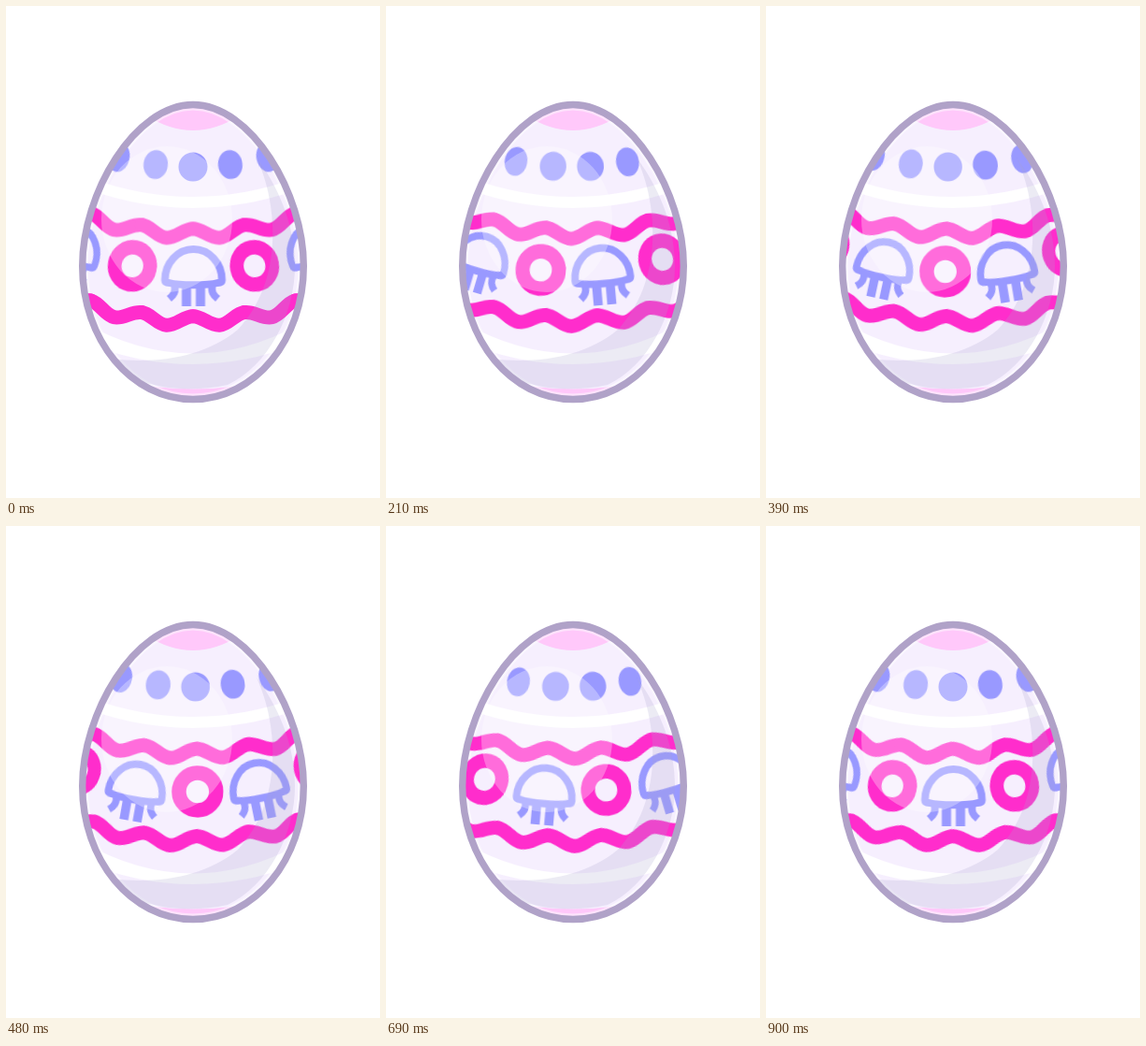
Recreate the animation shown at these times as an HTML page without scripts. Size 400 by 526 pixels, loop 930 ms.

```html
<!DOCTYPE html>
<html lang="en">
<head>
<meta charset="utf-8">
<title>Turning egg</title>
<style>
  html, body { margin: 0; width: 100%; height: 100%; overflow: hidden; background: #fff; }
  svg { display: block; width: 100%; height: 100%; }

  /* Each item sits in slot --i of an arc and advances two slots per loop. */
  .item {
    --next: calc(var(--i) + 1);
    --last: calc(var(--i) + 2);
    animation: ride 930ms steps(15) infinite;
  }
  .dots { --step: -7.16deg; --r: 320px; --squash: .19; fill: #9999ff; }
  .belt { --step: -10.75deg; --r: 350px; --squash: .055; }
  .wave { fill: none; stroke: #ff2dcc; stroke-width: 15; stroke-linecap: round;
          animation: turn 930ms steps(30) infinite; }

  @keyframes ride {
    0% { transform: rotate(calc(var(--i) * var(--step))) translateY(var(--r))
         scaleX(calc(1 / (1 + var(--squash) * max(var(--i), -1 * var(--i))))); }
    48.3871% { transform: rotate(calc(var(--next) * var(--step))) translateY(var(--r))
         scaleX(calc(1 / (1 + var(--squash) * max(var(--next), -1 * var(--next))))); }
    96.7742%, 100% { transform: rotate(calc(var(--last) * var(--step))) translateY(var(--r))
         scaleX(calc(1 / (1 + var(--squash) * max(var(--last), -1 * var(--last))))); }
  }
  @keyframes turn {
    0% { transform: rotate(0deg); }
    96.7742%, 100% { transform: rotate(-17.34deg); }
  }
</style>
</head>
<body>
<svg viewBox="0 0 400 526">
  <defs>
    <path id="egg" d="M200 105.5C138 105.5 81.7 200 81.7 278C81.7 357 134 420.5 200 420.5S318.3 357 318.3 278C318.3 200 262 105.5 200 105.5Z"/>
    <clipPath id="shell"><use href="#egg"/></clipPath>

    <circle id="dot" r="15.5"/>
    <circle id="ring" r="20" fill="none" stroke="#ff2dcc" stroke-width="15.5"/>
    <g id="jelly" fill="none" stroke="#9999ff" stroke-width="8" transform="translate(0 -4)">
      <path stroke-linejoin="round" d="M-30.5 13A30.5 33 0 0 1 30.5 13Q30.5 16 26 16C15 19 -15 19 -26 16Q-30.5 16 -30.5 13Z"/>
      <path d="M-20 18C-19 26 -21 29 -26 33M20 18C19 26 21 29 26 33"/>
      <path stroke-width="10" d="M-7.5 18V41M7.5 18V41"/>
    </g>

    <path id="ripple" d="M-27.57 363.66C-17.4 364.43 -10.2 375.3 0 375.3S17.4 364.43 27.57 363.66"/>
    <g id="pair">
      <use href="#ripple" transform="rotate(4.335)"/>
      <use href="#ripple" transform="rotate(-4.335)"/>
    </g>
    <g id="ripples">
      <use href="#pair" transform="rotate(34.68)"/>
      <use href="#pair" transform="rotate(17.34)"/>
      <use href="#pair"/>
      <use href="#pair" transform="rotate(-17.34)"/>
    </g>
  </defs>

  <g clip-path="url(#shell)">
    <use href="#egg" fill="#f6effe"/>
    <path fill="#fff" d="M90 184Q200 224 310 184V197Q200 235 90 197Z"/>
    <path fill="#fff" d="M80 337Q200 406 320 337V358Q200 408 80 358Z"/>
    <path fill="#ffc8fa" d="M150 100H250V117Q200 149 150 117Z"/>
    <path fill="#ffc8fa" d="M150 406Q200 413 250 406V424H150Z"/>
    <use href="#egg" fill="none" stroke="#fff" stroke-opacity=".5" stroke-width="12"/>

    <g class="dots" transform="translate(200 -148)">
      <use class="item" href="#dot" style="--i:-4"/>
      <use class="item" href="#dot" style="--i:-3"/>
      <use class="item" href="#dot" style="--i:-2"/>
      <use class="item" href="#dot" style="--i:-1"/>
      <use class="item" href="#dot" style="--i:0"/>
      <use class="item" href="#dot" style="--i:1"/>
      <use class="item" href="#dot" style="--i:2"/>
    </g>

    <g transform="translate(200 -126.5)"><use class="wave" href="#ripples"/></g>
    <g transform="translate(200 -33)"><use class="wave" href="#ripples"/></g>

    <g class="belt" transform="translate(200.5 -66)">
      <use class="item" href="#jelly" style="--i:-4"/>
      <use class="item" href="#ring" style="--i:-3"/>
      <use class="item" href="#jelly" style="--i:-2"/>
      <use class="item" href="#ring" style="--i:-1"/>
      <use class="item" href="#jelly" style="--i:0"/>
      <use class="item" href="#ring" style="--i:1"/>
      <use class="item" href="#jelly" style="--i:2"/>
    </g>

    <!-- Shade and highlight stay still over the turning pattern. -->
    <path fill="#a8a4cc" fill-opacity=".22" d="M268 162C296 200 309 240 309 278C309 330 280 385 237 405C205 412 170 410 148 402Q126 392 112 377C160 383 212 376 248 346C296 295 292 215 268 162Z"/>
    <ellipse cx="172" cy="228" rx="70" ry="78" fill="#fff" fill-opacity=".3"/>
  </g>
  <use href="#egg" fill="none" stroke="#b0a2c8" stroke-width="7.4"/>
</svg>
</body>
</html>
```
